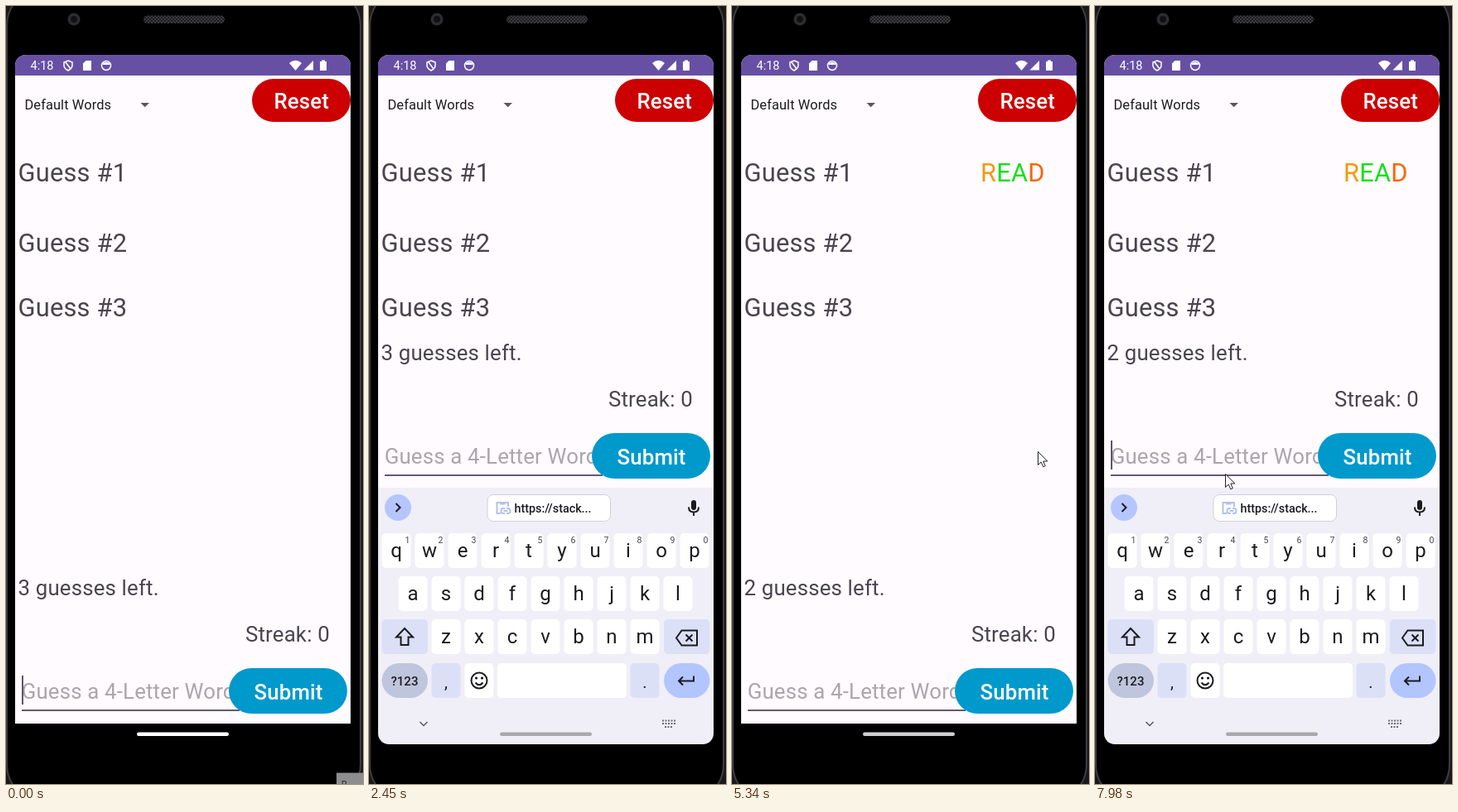
Recreate the animation shown at these times as an HTML page. Size 431 px wide and 940 px high, loop 8 s.

```html
<!DOCTYPE html>
<html lang="en">
<head>
<meta charset="utf-8">
<title>Word guessing game</title>
<style>
html, body { margin: 0; width: 100%; height: 100%; overflow: hidden; background: #000; }
svg { display: block; width: 431px; height: 940px; }
text { font-family: Roboto, sans-serif; white-space: pre; }
.label, .body, .btn { letter-spacing: .007em; }
.label { font-size: 30.8px; fill: #49454f; }
.body { font-size: 25.8px; fill: #49454f; }
.btn { font-size: 25.8px; font-weight: 500; fill: #fff; text-anchor: middle; }
.key { font-size: 24px; fill: #1b1b1f; text-anchor: middle; }
.sup { font-size: 10.5px; fill: #45464f; text-anchor: middle; }
.line { fill: none; stroke: #1b1b1f; stroke-width: 2; }

/* One loop is 8 s, so 1% is 80 ms. */
.panel, .caret, .caret-x, .before, .after, .hint, .r, .rea, .read, .chip, .pointer-on, .click {
  animation: 8s step-end infinite;
}
.panel { animation-name: panel; }
.caret { animation-name: blink; }
.caret-x { animation-name: caret; }
.before { animation-name: before; }
.after { animation-name: after; }
.hint { animation-name: hint; }
.r { animation-name: r; }
.rea { animation-name: rea; }
.read { animation-name: read; }
.chip { animation-name: chip; }
.pointer-on { animation-name: pointer-on; }
.click { animation-name: click; }
.board { animation: board 8s linear infinite; }
.pill { animation: pill 8s linear infinite; }
.tip { animation: tip 8s linear infinite; }
.pointer { animation: pointer 8s ease-in-out infinite; }

@keyframes panel {
  0%, 55.6% { transform: none; }
  19.375%, 85.75%, 100% { transform: translateY(-284px); }
}
@keyframes board {
  0%, 19.375% { transform: translateY(310px); opacity: .6; }
  20.25% { transform: translateY(165px); opacity: .74; }
  21.125% { transform: translateY(70px); opacity: .85; }
  22% { transform: translateY(18px); opacity: .96; }
  23%, 55.6% { transform: none; opacity: 1; }
  57% { transform: translateY(70px); opacity: .85; }
  59%, 85.75% { transform: translateY(310px); opacity: .6; }
  86.6% { transform: translateY(165px); opacity: .74; }
  87.5% { transform: translateY(70px); opacity: .85; }
  88.4% { transform: translateY(18px); opacity: .96; }
  89.4%, 100% { transform: none; opacity: 1; }
}
@keyframes blink {
  0%, 7.125%, 16.25%, 33.875%, 68.5%, 82.375%, 97.25%, 100% { opacity: 1; }
  .875%, 13.375%, 27.6%, 62.375%, 74.75%, 91.25% { opacity: 0; }
}
@keyframes caret {
  0%, 54.75%, 100% { transform: none; }
  36.5% { transform: translateX(16px); }
  43.5% { transform: translateX(48px); }
  46.125% { transform: translateX(65px); }
}
@keyframes before { 0% { opacity: 1; } 54.75%, 100% { opacity: 0; } }
@keyframes after { 0% { opacity: 0; } 54.75%, 100% { opacity: 1; } }
@keyframes hint { 0%, 54.75%, 100% { opacity: 1; } 36.5% { opacity: 0; } }
@keyframes r { 0%, 43.5%, 100% { opacity: 0; } 36.5% { opacity: 1; } }
@keyframes rea { 0%, 46.125%, 100% { opacity: 0; } 43.5% { opacity: 1; } }
@keyframes read { 0%, 54.75%, 100% { opacity: 0; } 46.125% { opacity: 1; } }
@keyframes chip { 0%, 55.6% { opacity: 0; } 26.25%, 92.5%, 100% { opacity: 1; } }
@keyframes pill {
  0%, 26% { fill: #fff; }
  30%, 45.25% { fill: #a9a9ad; }
  49.6%, 62.4% { fill: #636267; }
  66.75% { fill: #cfcfd0; }
  69.4%, 92.75% { fill: #fff; }
  99.5%, 100% { fill: #a9a9ad; }
}
@keyframes tip { 0%, .875% { opacity: 1; } 2.5%, 100% { opacity: 0; } }
@keyframes pointer {
  0%, 3.125% { transform: translate(431px, 936px); }
  8.375%, 12.5% { transform: translate(371px, 828px); }
  16.875%, 19.4% { transform: translate(190px, 795px); }
  19.5%, 35.6% { transform: translate(387px, 753px); }
  41.75%, 45.25% { transform: translate(345px, 516px); }
  49.625%, 73.6% { transform: translate(369px, 538px); }
  80.625%, 86% { transform: translate(187px, 805px); }
  92.75%, 94.5% { transform: translate(366px, 922px); }
  98%, 100% { transform: translate(157px, 565px); }
}
@keyframes pointer-on {
  0%, 19.375% { opacity: 0; }
  3.125%, 35.6%, 100% { opacity: 1; }
}
@keyframes click {
  0%, 17.5%, 53.875%, 86.6%, 100% { opacity: 0; }
  16.25%, 52.06%, 84.875% { opacity: .75; }
}
</style>
</head>
<body>
<svg viewBox="0 0 431 940">
  <defs>
    <clipPath id="screen"><rect x="11" y="59" width="405" height="833" rx="13"/></clipPath>
    <pattern id="mesh" width="4" height="4" patternUnits="userSpaceOnUse">
      <rect width="4" height="4" fill="#1c1c1e"/>
      <path d="M0 0L4 4M4 0L0 4" stroke="#3c3c3f"/>
    </pattern>
  </defs>

  <!-- Phone body -->
  <rect width="431" height="940" fill="#19191c"/>
  <rect x="1" y="-22" width="427" height="984" rx="46" fill="#000" stroke="#3d3c42" stroke-width="2"/>
  <circle cx="82" cy="16" r="7.5" fill="#2d2d2f"/>
  <circle cx="82" cy="16" r="4" fill="#111113"/>
  <rect x="166" y="11.500" width="98" height="9.500" rx="4.500" fill="url(#mesh)"/>

  <g clip-path="url(#screen)">
    <rect x="11" y="59" width="405" height="808" fill="#fffbff"/>

    <!-- Status bar -->
    <rect x="11" y="59" width="405" height="25" fill="#6750a4"/>
    <g fill="#fff">
      <text x="29.500" y="77" font-size="14.500">4:18</text>
      <path d="M93 69.500L96.500 66H103V78H93Z"/>
      <path d="M342 69Q349.500 62.500 357 69L349.500 78Z"/>
      <path d="M371 66V77.500H359.500Z"/>
      <path d="M379 67H381V65.500H385V67H387V78H379Z"/>
      <path d="M117 69.500Q121 66 125 69.500V71H117Z"/>
    </g>
    <g fill="none" stroke="#fff" stroke-width="1.500">
      <path d="M75 66L80 68V71.500Q80 75.500 75 78Q70 75.500 70 71.500V68ZM72 68L78 76"/>
      <circle cx="121" cy="72" r="5.500"/>
    </g>

    <!-- Header and guesses -->
    <text x="22.500" y="125" font-size="16.400" letter-spacing=".1" fill="#1c1b1f">Default Words</text>
    <path d="M162.500 117H173L167.700 122.300Z" fill="#5b5560"/>
    <rect x="297" y="88" width="119" height="52" rx="26" fill="#c00"/>
    <text class="btn" x="356.700" y="124">Reset</text>
    <text class="label" x="14.500" y="212">Guess #1</text>
    <text class="label" x="14.500" y="297">Guess #2</text>
    <text class="label" x="14.500" y="374.500">Guess #3</text>
    <text class="label after" x="300" y="212"><tspan fill="#f5980c">R</tspan><tspan fill="#16df1b">EA</tspan><tspan fill="#f96508">D</tspan></text>

    <!-- Entry panel -->
    <g class="panel">
      <text class="body before" x="14.500" y="712">3 guesses left.</text>
      <text class="body after" x="14.500" y="712">2 guesses left.</text>
      <text class="body" x="289" y="768">Streak: 0</text>
      <text class="body hint" x="18.700" y="836.500" style="fill:#aaa6ab">Guess a 4-Letter Word</text>
      <g id="typed"></g>
      <rect x="19" y="850" width="263" height="2" fill="#625a72"/>
      <g class="caret-x"><rect class="caret" x="19" y="809" width="2" height="35" fill="#5d5570"/></g>
      <rect x="269" y="800" width="143" height="55" rx="27.500" fill="#09c"/>
      <text class="btn" x="341" y="837.500">Submit</text>
    </g>

    <!-- On-screen keyboard -->
    <g class="board">
      <rect x="11" y="582" width="405" height="310" fill="#f0eff7"/>
      <circle cx="35" cy="606" r="16" fill="#b5c6ff"/>
      <path class="line" d="M32.500 601L37.500 606L32.500 611"/>
      <g class="chip">
        <rect x="143" y="590.500" width="148.500" height="32" rx="7" fill="#fff" stroke="#cfcfda"/>
        <g fill="none" stroke="#b5c0ee" stroke-width="2">
          <path d="M159 613H154.500V600H168V605M158 601.500H164.500"/>
          <path d="M164 607H162Q159.500 607 159.500 610T162 613H164M166 607H168Q170.500 607 170.500 610T168 613H166M162.500 610H167.500"/>
        </g>
        <text x="175.500" y="612" font-size="14.300" font-weight="500" fill="#1b1b1f">https://stack...</text>
      </g>
      <rect x="389" y="597" width="6" height="12" rx="3" fill="#1b1b1f"/>
      <path class="line" d="M386 605.500Q386 611.500 392 611.500T398 605.500M392 611.500V616"/>
      <g id="keys"></g>
      <path class="line" d="M43 752L53 762.500H47.500V772H38.500V762.500H33Z"/>
      <path class="line" d="M371 763.500L377.500 754.500H396V772.500H377.500ZM382.500 759.500L390.500 767.500M390.500 759.500L382.500 767.500"/>
      <circle class="line" cx="133" cy="815" r="9.500"/>
      <path class="line" d="M128.500 817.500Q133 823 137.500 817.500"/>
      <circle cx="129.500" cy="812" r="1.500"/>
      <circle cx="136.500" cy="812" r="1.500"/>
      <path class="line" d="M392 809.500V815.500H374.500M379 810.500L374 815.500L379 820.500"/>
      <path class="line" d="M61.500 865L66 869.500L70.500 865" style="stroke:#55565e;stroke-width:1.500"/>
      <path d="M354 863.500H370M354 867H370M357 871H367" fill="none" stroke="#6b6c74" stroke-width="2" stroke-dasharray="2 1.500"/>
    </g>
    <rect class="pill" x="158" y="877.500" width="111" height="4.500" rx="2.200"/>
  </g>

  <g class="tip">
    <rect x="399" y="926.500" width="33" height="14" fill="#8d8d90"/>
    <text x="405" y="944" font-size="10" fill="#222">P</text>
  </g>

  <g class="pointer"><g class="pointer-on">
    <circle class="click" cx="-1" cy="-1" r="12" fill="#d3de3c"/>
    <path d="M.5 .5V16.500L4.200 13L6.800 18.800L9.300 17.700L6.800 12H11.800Z" fill="#fff" stroke="#222" stroke-width="1"/>
  </g></g>
</svg>
<script>
const ns = 'http://www.w3.org/2000/svg';

function add(parent, tag, attrs, text = '') {
  const el = document.createElementNS(ns, tag);
  for (const name in attrs) el.setAttribute(name, attrs[name]);
  el.textContent = text;
  parent.append(el);
  return el;
}

// Typed guess, one underlined copy per typing stage
const typed = document.getElementById('typed');
const stages = { R: 15, REA: 47, READ: 64 };
for (const word in stages) {
  const g = add(typed, 'g', { class: word.toLowerCase() });
  add(g, 'text', { class: 'body', x: 18.7, y: 837, style: 'fill:#1c1b1f' }, word);
  add(g, 'rect', { x: 19.5, y: 839, width: stages[word], height: 1.5, fill: '#1c1b1f' });
}

// Keyboard
const keys = document.getElementById('keys');
const soft = '#dce0f7';

function cap(x, y, width, fill = '#fff', rx = 5) {
  add(keys, 'rect', { x, y, width, height: 42, rx, fill });
}

[['qwertyuiop', 33], ['asdfghjkl', 53], ['zxcvbnm', 93]].forEach(([letters, start], row) => {
  const y = 637 + row * 52;
  [...letters].forEach((letter, i) => {
    const x = start + i * 40;
    cap(x - 17.5, y, 35);
    add(keys, 'text', { class: 'key', x, y: y + 29 }, letter);
    if (row === 0) add(keys, 'text', { class: 'sup', x: x + 13.5, y: y + 12 }, (i + 1) % 10);
  });
});

cap(15.5, 741, 55.5, soft);
cap(356, 741, 55.5, soft);
cap(15.5, 794, 55.5, '#bfc5dc', 21);
cap(75.5, 794, 35, soft);
cap(115.5, 794, 35);
cap(155, 794, 156);
cap(315.5, 794, 35, soft);
cap(356, 794, 55.5, '#b2c5ff', 21);
add(keys, 'text', { class: 'key', x: 43, y: 820.5, style: 'font-size:15px;font-weight:500' }, '?123');
add(keys, 'text', { class: 'key', x: 93, y: 824, style: 'font-size:20px' }, ',');
add(keys, 'text', { class: 'key', x: 333, y: 824, style: 'font-size:20px' }, '.');
</script>
</body>
</html>
```
